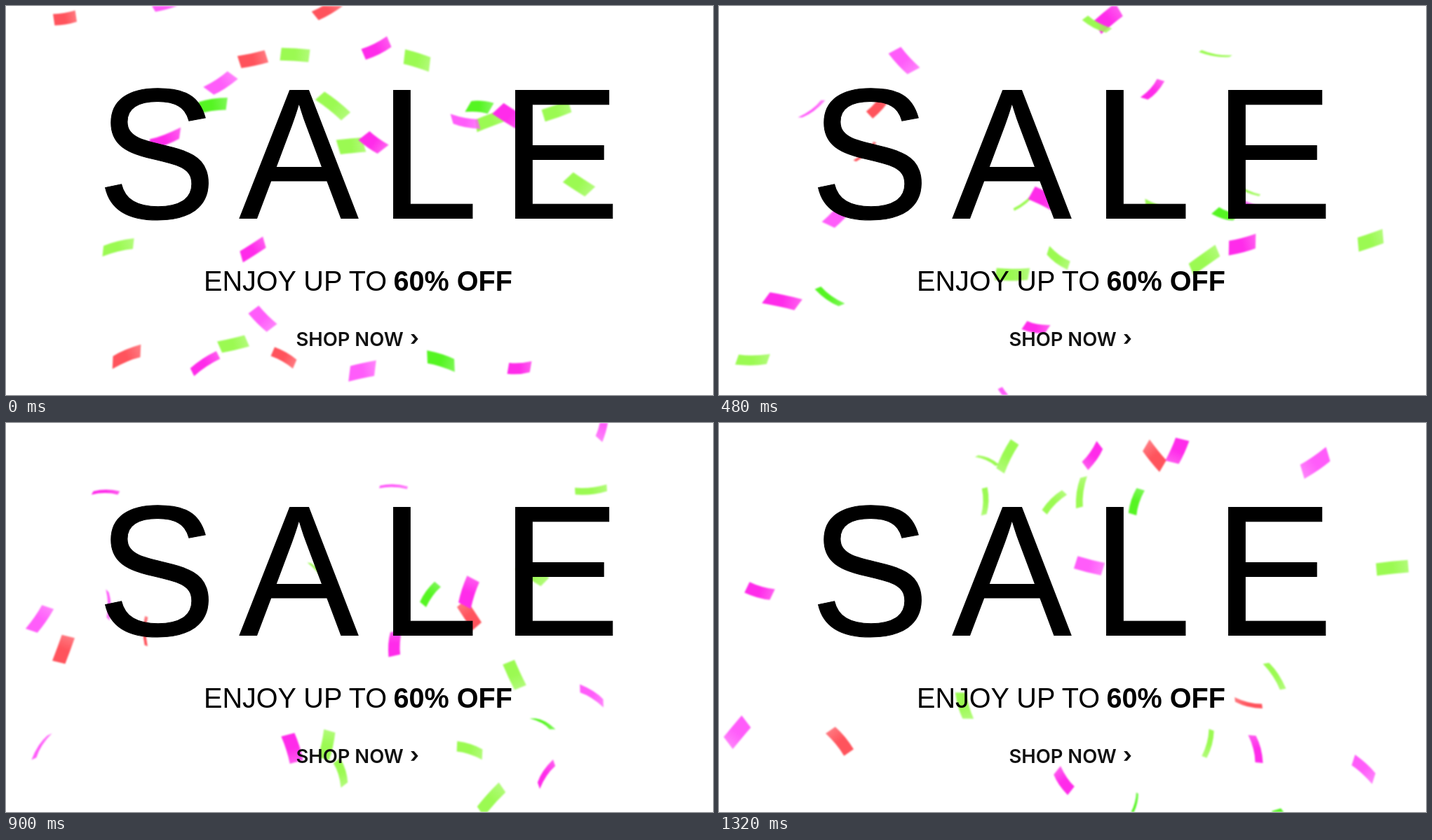
These frames come from a looping animation (1008x556 px, 1380 ms). An HTML page with a canvas:

```html
<!DOCTYPE html>
<html lang="en">
<head>
<meta charset="utf-8">
<title>Sale</title>
<style>
html, body { margin: 0; width: 100%; height: 100%; overflow: hidden; background: #fff; }
canvas, svg { position: absolute; left: 0; top: 0; width: 1008px; height: 556px; }
canvas { filter: blur(1.1px); }
.big { font: 400 255px "Liberation Sans", Arial, sans-serif; stroke: #000; stroke-width: 1; }
.offer { font: 400 39.6px "Liberation Sans", Arial, sans-serif; }
.offer.strong { font-weight: 700; }
.shop { font: 600 27.4px Inter, sans-serif; fill: #111; }
.arrow { font: 700 30px Inter, sans-serif; fill: #111; }
</style>
</head>
<body>
<canvas width="1008" height="556"></canvas>
<svg viewBox="0 0 1008 556">
  <text class="big" transform="translate(0 303.5) scale(1 1.043)" x="130 332.5 531.6 705.6">SALE</text>
  <g transform="translate(0 407) scale(1 1.043)">
    <text class="offer" x="282">ENJOY UP TO</text>
    <text class="offer strong" x="552.5">60% OFF</text>
  </g>
  <text class="shop" x="413.5" y="486">SHOP NOW</text>
  <text class="arrow" x="576" y="485">›</text>
</svg>
<script>
const STEP = 60, STEPS = 23, W = 1008, H = 556;
const RED = '#ff535c', PINK = '#ff2bea', ORCHID = '#ff5cfa', GREEN = '#55f522', LIME = '#9bfa52';
const ctx = document.querySelector('canvas').getContext('2d');
const flakes = [];

let seed = 11;
const rand = (lo, hi) => {
  seed = seed * 16807 % 2147483647;
  return lo + (hi - lo) * seed / 2147483647;
};
const pick = list => list[Math.floor(rand(0, list.length))];

// Place at the start of the loop and drift per step; a negative y enters later.
function flake(color, x, y, vx, vy) {
  flakes.push({
    color, x, y, vx, vy,
    length: rand(32, 48), width: rand(16, 22),
    angle: rand(-.6, .8), spin: rand(-.12, .12),
    roll: rand(-.7, .7), rollSpeed: rand(.15, .4),
    skew: rand(-4, 4)
  });
}

// Fanning out to the left
flake(RED, 84, 17, -14, 26);
flake(RED, 352, 76, -18, 16.5);
flake(RED, 260, -40, -4, 22.5);
flake(ORCHID, 228, -5, -12, 19);
flake(ORCHID, 306, 110, -17, 23.5);
flake(GREEN, 294, 143, -17, 34);
flake(PINK, 226, 190, -17, 29);
flake(LIME, 160, 345, -14, 20);
flake(PINK, 322, -200, -12, 20);
flake(ORCHID, 400, -130, -17, 26);

// Down the middle
flake(RED, 458, 4, 13.5, 18);
flake(LIME, 412, 70, 3, 26);
flake(PINK, 528, 60, -8, 27);
flake(LIME, 586, 78, 5, 26);
flake(LIME, 466, 143, -6, 30);
flake(LIME, 492, 200, -1, 20);
flake(PINK, 524, 195, -9, 33);
flake(PINK, 352, 348, 21, 34);
flake(ORCHID, 366, 447, 6, 14);
flake(LIME, 324, 483, 5, 27);
flake(ORCHID, 605, -148, -3.5, 16);
flake(PINK, 690, -105, -9, 28);
flake(PINK, 435, -238, 15, 32);
flake(GREEN, 635, -400, -2, 43);
flake(LIME, 647, -190, -13.5, 27);

// Fanning out to the right
flake(GREEN, 675, 145, 6, 19);
flake(LIME, 692, 163, 0, 25);
flake(ORCHID, 655, 165, 12, 15);
flake(PINK, 718, 157, 3.5, 23);
flake(LIME, 785, 150, -4, 14);
flake(LIME, 817, 255, 14, 10);
flake(LIME, 660, -100, 6, 21);
flake(LIME, 564, -145, 18, 16);
flake(ORCHID, 850, -119, 0, 8);

// Leaving at the bottom, then a late shower from the top
for (let i = 0; i < 6; i++) {
  flake([RED, PINK, RED, ORCHID, GREEN, PINK][i], 172 + i * 112, rand(480, 525), rand(-6, 6), 40);
}
for (let i = 0; i < 9; i++) {
  flake(pick([RED, PINK, GREEN, GREEN, LIME]), rand(380, 540), rand(-600, -470), rand(-8, 8), 29);
}

function draw(f, t) {
  const x = f.x + f.vx * t, y = f.y + f.vy * t;
  if (x < -40 || x > W + 40 || y < -40 || y > H + 40) return;
  const roll = f.roll + f.rollSpeed * t;
  const half = f.length / 2;
  const thick = f.width / 2 * Math.max(.2, Math.abs(Math.cos(roll)));
  const curl = 5 * Math.sin(roll), skew = f.skew;
  ctx.save();
  ctx.translate(x, y);
  ctx.rotate(f.angle + f.spin * t);
  ctx.beginPath();
  ctx.moveTo(-half + skew, -thick);
  ctx.quadraticCurveTo(0, curl - thick, half + skew, -thick);
  ctx.lineTo(half - skew, thick);
  ctx.quadraticCurveTo(0, curl + thick, -half - skew, thick);
  const shade = ctx.createLinearGradient(-half, 0, half, 0);
  shade.addColorStop(.5, f.color);
  shade.addColorStop(1, f.color + 'c8');
  ctx.fillStyle = shade;
  ctx.fill();
  ctx.restore();
}

const start = performance.now();
function frame() {
  const t = Math.floor((performance.now() - start) / STEP) % STEPS;
  ctx.clearRect(0, 0, W, H);
  for (const f of flakes) draw(f, t);
  requestAnimationFrame(frame);
}
frame();
</script>
</body>
</html>
```
